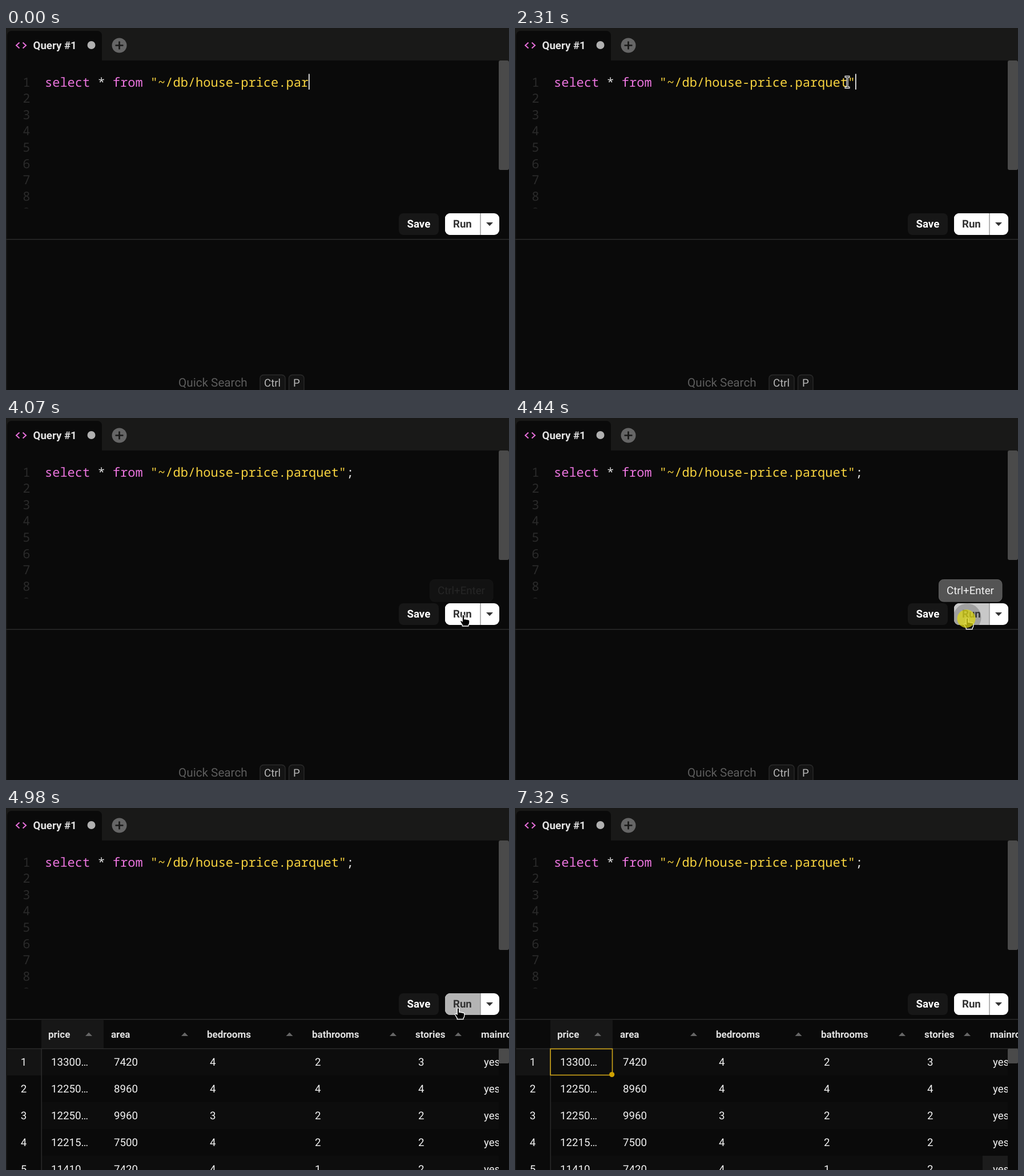
An HTML page for the animation above (7.46 s loop, 881 by 635 pixels).

```html
<!DOCTYPE html>
<html lang="en">
<head>
<meta charset="utf-8">
<title>Query editor</title>
<style>
  html, body { margin: 0; width: 100%; height: 100%; overflow: hidden; background: #0a0a0a; }
  svg { display: block; width: 881px; height: 635px; }
  text { font: 18.67px Roboto, sans-serif; fill: #f2f2f2; white-space: pre; text-rendering: geometricPrecision; }
  .bold { font-weight: 700; }
  .head { font-size: 17px; font-weight: 700; fill: #e0e0e0; }
  .code { font: 22px "Noto Sans Mono", monospace; fill: #ddd; }
  .num { fill: #2a2a2a; }
  .key { fill: #ec75df; }
  .str { fill: #f7d33f; }
  .cap { fill: #141414; stroke: #2b2b2b; stroke-width: 1.3; }
  .capText { fill: #b8b8b8; }
  .cursor { fill: #000; stroke: #fff; stroke-width: 1.3; stroke-linejoin: round; }
</style>
</head>
<body>
<svg viewBox="0 0 881 635">
  <defs>
    <clipPath id="editorClip"><rect y="57" width="863" height="259.5"/></clipPath>
    <clipPath id="cellClip"><rect y="422" width="863" height="213"/></clipPath>
    <clipPath id="runClip"><path d="M831 325V363H778a9 9 0 0 1-9-9V334a9 9 0 0 1 9-9Z"/></clipPath>
  </defs>

  <rect width="881" height="635" fill="#0a0a0a"/>
  <rect width="1.5" height="635" fill="#191919"/>
  <rect width="881" height="57" fill="#191918"/>
  <path d="M2 57V13a8 8 0 0 1 8-8H160a8 8 0 0 1 8 8V57Z" fill="#0a0a0a"/>
  <path d="M23.5 25.5 18 30.5 23.5 35.5M29.5 25.5 35 30.5 29.5 35.5" fill="none" stroke="#e66fd9" stroke-width="2"/>
  <text class="bold" x="47.5" y="36.6" style="fill:#e2e2e2;font-weight:600">Query #1</text>
  <circle cx="149.5" cy="30" r="7" fill="#b0b0b0"/>
  <circle cx="198.5" cy="30.5" r="13" fill="#666"/>
  <path d="M191.5 30.5H205.5M198.5 23.5V37.5" stroke="#191918" stroke-width="2.7"/>

  <g id="lines" clip-path="url(#editorClip)"></g>
  <text class="code" x="68" y="102.6"><tspan class="key">select</tspan> * <tspan class="key">from</tspan> <tspan class="str" id="path"></tspan><tspan id="semi"></tspan></text>
  <rect id="caret" y="80.5" width="1.6" height="27.5" fill="#fff"/>
  <rect x="863" y="57" width="18" height="192" rx="3" fill="#4a4a4a"/>

  <rect x="688" y="325" width="70" height="38" rx="8" fill="#171717"/>
  <text class="bold" x="702.5" y="350.4" style="fill:#fff">Save</text>
  <rect x="769" y="325" width="95" height="38" rx="9" fill="#fff"/>
  <g clip-path="url(#runClip)">
    <rect id="run" x="769" y="325" width="62" height="38"/>
    <circle id="ripple" cx="792" cy="350"/>
  </g>
  <path d="M831 325V363" stroke="#8c8c8c" stroke-width="1.3"/>
  <text class="bold" x="783" y="350.4" style="fill:#333">Run</text>
  <path d="M841 341H853L847 347.3Z" fill="#333"/>
  <rect y="370" width="881" height="1.5" fill="#2a2a2a"/>

  <g id="search">
    <text x="302" y="629" style="font-size:20.7px;fill:#5c5c5c">Quick Search</text>
    <rect class="cap" x="445" y="608.5" width="44" height="32" rx="6"/>
    <rect class="cap" x="495.5" y="608.5" width="26.5" height="32" rx="6"/>
    <text class="capText" x="452" y="629">Ctrl</text>
    <text class="capText" x="503" y="629">P</text>
  </g>

  <g id="table">
    <rect x="62" y="371.5" width="109" height="51" fill="#171717"/>
    <rect x="2" y="422" width="60" height="47" fill="#141414"/>
    <g id="stripes"></g>
    <rect id="hover" x="819" width="44" height="47" fill="#1c1c1c"/>
    <rect x="2" y="421.5" width="879" height="1.5" fill="#2a2a2a"/>
    <rect x="61.5" y="422" width="1.5" height="213" fill="#2a2a2a"/>
    <g id="heads"></g>
    <g id="cells" clip-path="url(#cellClip)"></g>
    <rect x="863" y="422" width="18" height="26" rx="2" fill="#4a4a4a"/>
    <g id="pick">
      <rect x="62" y="422.5" width="108.5" height="46" fill="none" stroke="#cfa518" stroke-width="1.6"/>
      <circle cx="169.7" cy="467.5" r="4.6" fill="#cfa100"/>
    </g>
  </g>

  <g id="tip">
    <rect x="742.5" y="283.5" width="110.5" height="38.5" rx="8" fill="#545454" stroke="#626262"/>
    <text x="756" y="309.3">Ctrl+Enter</text>
  </g>

  <g id="pointer">
    <path id="arrow" class="cursor" d="M0 0V21L5 16.5 8.5 24 12 22.5 8.7 15H15.5Z"/>
    <path id="hand" class="cursor" d="M-1.8 1.5a1.8 1.8 0 0 1 3.6 0V7.5q1.6-1 3.2.3 1.6-.8 3 .6 2.7-.6 2.9 2V13q0 3-1.8 4.5V19.5H-1.8V17.5Q-4 14.5-5.3 11.5q0-2.5 2.1-1.6l1.4 1.5Z"/>
    <g id="beam" fill="none">
      <path d="M-4.5-9.5H4.5M0-9.5V9.5M-4.5 9.5H4.5" stroke="#fff" stroke-width="3.4"/>
      <path d="M-3.5-9.5H3.5M0-9.5V9.5M-3.5 9.5H3.5" stroke="#000" stroke-width="1.1"/>
    </g>
    <circle id="press" cy="1" r="16" fill="#dcd714" opacity=".75"/>
  </g>
</svg>
<script>
const LOOP = 7460, CHAR = 13.2, ROW = 47, TOP = 422;
const $ = id => document.getElementById(id);
const set = (id, attrs) => { for (const k in attrs) $(id).setAttribute(k, attrs[k]); };
const show = (id, on) => { $(id).style.display = on ? '' : 'none'; };
const ramp = (t, a, b) => Math.min(1, Math.max(0, (t - a) / (b - a)));
const within = (t, a, b) => t >= a && t < b;

function add(parent, tag, attrs, text = '') {
  const el = document.createElementNS('http://www.w3.org/2000/svg', tag);
  for (const k in attrs) el.setAttribute(k, attrs[k]);
  el.textContent = text;
  $(parent).append(el);
}

for (let i = 0; i < 9; i++)
  add('lines', 'text', { class: 'code num', x: 29.2, y: 102.6 + i * 28.6 }, i + 1);

const columns = [
  ['price', 74, 145], ['area', 184, 313], ['bedrooms', 352, 496.5],
  ['bathrooms', 536, 678], ['stories', 717, 792], ['mainroad', 832]
];
for (const [name, x, sort] of columns) {
  add('heads', 'text', { class: 'head', x, y: 403 }, name);
  if (sort) add('heads', 'path', { d: `M${sort - 6} 400h12l-6-6.3Z`, fill: '#666' });
}

const rows = ['13300… 7420 4 2 3 yes', '12250… 8960 4 4 4 yes', '12250… 9960 3 2 2 yes',
  '12215… 7500 4 2 2 yes', '11410… 7420 4 1 2 yes'];
rows.forEach((row, i) => {
  const y = TOP + i * ROW;
  if (i % 2 === 0) add('stripes', 'rect', { x: 62, y, width: 801, height: ROW, fill: '#0d0d0d' });
  add('cells', 'text', { x: 31, y: y + 29.8, 'text-anchor': 'middle' }, i + 1);
  row.split(' ').forEach((value, c) =>
    add('cells', 'text', { x: columns[c][1] + 5, y: y + 29.8 }, value));
});

// Typing: the time at which each further character appears
const file = '"~/db/house-price.parquet"';
const keys = [1590, 1770, 1860, 2040, 2310, 3080];
const caretOff = [[270, 810], [1540, 1590], [2850, 3080], [3620, 4150], [4340, LOOP]];

const track = [
  [220, 760, 545], [780, 582, 95], [3640, 582, 95], [4070, 801, 345.5], [4340, 792, 351],
  [6540, 792, 351], [6860, 833, 633], [7230, 833, 633], [7320, 843, 637]
];
function pointerAt(t) {
  let i = 0;
  while (i < track.length - 2 && t >= track[i + 1][0]) i++;
  const [t0, x0, y0] = track[i], [t1, x1, y1] = track[i + 1];
  const u = ramp(t, t0, t1), e = u * u * (3 - 2 * u);
  return [x0 + (x1 - x0) * e, y0 + (y1 - y0) * e];
}

function draw(t) {
  const typed = keys.filter(k => t >= k).length;
  $('path').textContent = file.slice(0, 21 + typed);
  $('semi').textContent = typed > 5 ? ';' : '';
  set('caret', { x: 68 + CHAR * (35 + typed) });
  show('caret', !caretOff.some(([a, b]) => within(t, a, b)));

  const [x, y] = pointerAt(t);
  const onButton = x >= 688 && x <= 864 && y >= 325 && y <= 363;
  const overEditor = y < 317;
  set('pointer', { transform: `translate(${x} ${y})` });
  show('pointer', t >= 220 && t < 7320);
  show('beam', overEditor);
  show('hand', onButton);
  show('arrow', !overEditor && !onButton);
  show('press', within(t, 990, 1130) || within(t, 4390, 4540));
  set('press', { cy: overEditor ? -1 : 1, cx: overEditor ? -.5 : -1.5 });

  const shade = Math.round(255 - 55 * (ramp(t, 4080, 4330) - ramp(t, 6550, 6720)));
  set('run', { fill: `rgb(${shade},${shade},${shade})` });
  set('ripple', {
    r: 18 + 32 * ramp(t, 4390, 4640),
    opacity: t < 4390 ? 0 : (.2 - .1 * ramp(t, 4480, 4750)) * (1 - ramp(t, 4980, 5260))
  });
  set('tip', { opacity: ramp(t, 4045, 4270) * (1 - ramp(t, 4490, 4700)) });

  show('search', t < 4540);
  show('table', t >= 4980);
  show('pick', t >= 5030);
  show('hover', x > 819 && y > TOP);
  set('hover', { y: TOP + ROW * Math.min(4, Math.max(0, Math.floor((y - TOP) / ROW))) });
}

function tick() {
  draw(performance.now() % LOOP);
  requestAnimationFrame(tick);
}
tick();
</script>
</body>
</html>
```
